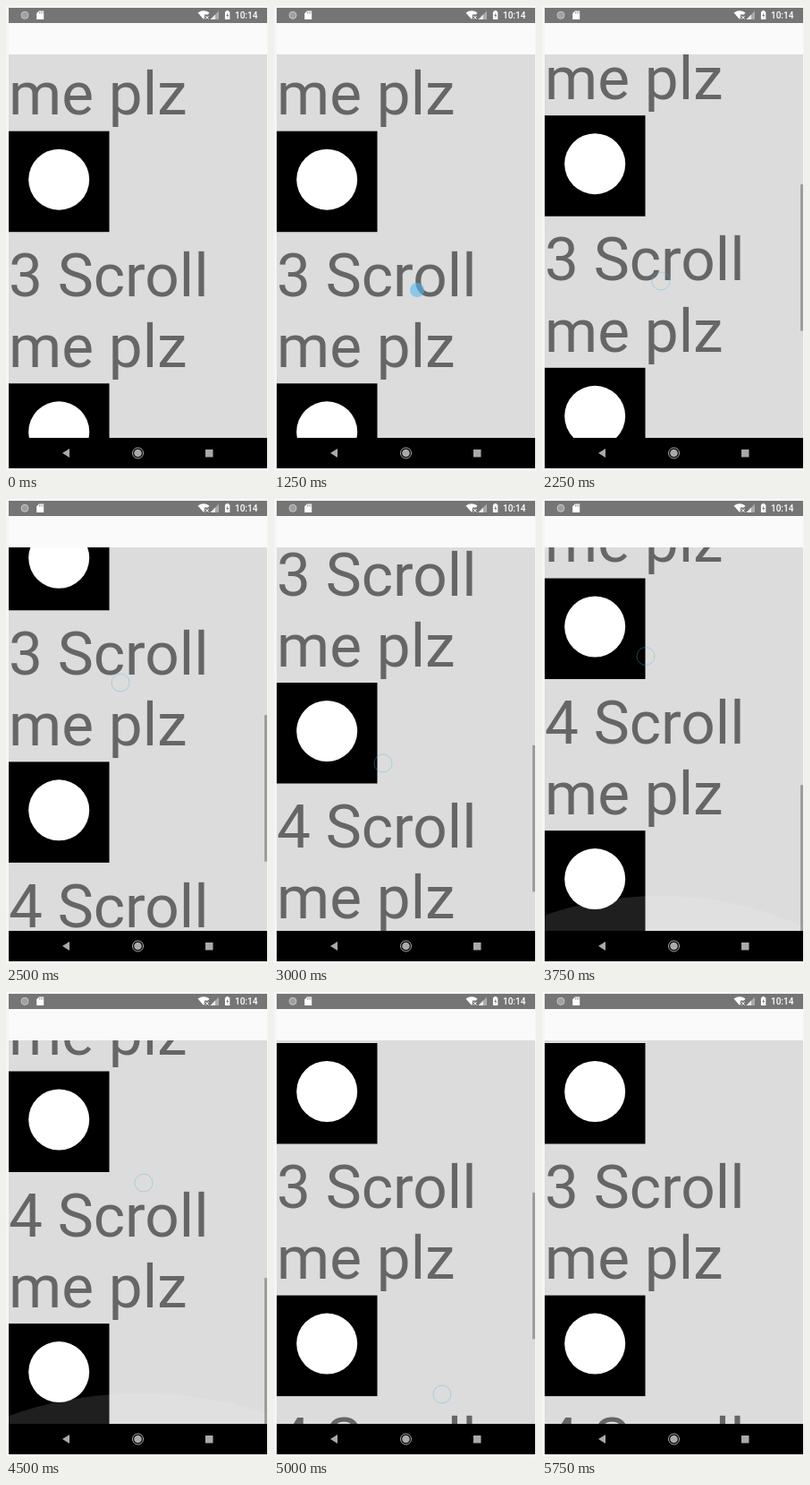
Recreate the animation shown at these times as an HTML page. Size 293x519 px, loop 6.25 s.

```html
<!DOCTYPE html>
<html lang="en">
<head>
<meta charset="utf-8">
<title>Scrolling list</title>
<style>
  html, body { margin: 0; width: 100%; height: 100%; overflow: hidden; background: #f5f5f5; }
  svg { display: block; width: 100vw; height: 100vh; }
  text { font-family: Roboto, sans-serif; }
  .big { font-size: 67.5px; fill: #666; }
  .clock { font-size: 10px; font-weight: 500; fill: #fff; }
</style>
</head>
<body>
<svg viewBox="0 0 293 519">
  <defs>
    <clipPath id="view"><rect x="3" y="54" width="289" height="429"/></clipPath>
  </defs>

  <rect x="3" y="54" width="289" height="429" fill="#dcdcdc"/>
  <g clip-path="url(#view)">
    <g id="list"></g>
    <ellipse id="glow" rx="347" fill="#fff" fill-opacity=".12"/>
    <rect id="bar" x="289" width="3" height="163.5" fill="#000" fill-opacity=".29"/>
  </g>

  <!-- status bar and header -->
  <rect x="3" y="2" width="289" height="17" fill="#757575"/>
  <rect x="3" y="19" width="289" height="35" fill="#fafafa"/>
  <circle cx="21" cy="10.3" r="4" fill="#a0a0a0" stroke="#c8c8c8"/>
  <path d="M37 5.5h5.2V15h-8V8.3z" fill="#fff"/>
  <path d="M37.5 6.5v2m1.7-2v2m1.7-2v2" stroke="#888" stroke-width=".8"/>
  <path d="M214.5 7.6q6.5-4.6 13 0l-1.6 2h-4v4l-1 1.2z" fill="#fff"/>
  <path d="M223 11l3.6 3.6m0-3.6L223 14.6" stroke="#fff"/>
  <path d="M238 5.5V15h-9.5z" fill="#aaa"/>
  <path d="M234 9.5V15h-5.5z" fill="#e8e8e8"/>
  <path d="M246.3 5h2.6v1.2h1.4V15h-5.4V6.2h1.4z" fill="#fff"/>
  <path d="M248 7.5L246.3 11h1.3v2.6l1.5-3.6h-1.3z" fill="#757575"/>
  <text class="clock" x="256" y="14">10:14</text>

  <!-- navigation bar -->
  <rect x="3" y="482" width="289" height="34" fill="#000"/>
  <path d="M71 494v10l-8-5z" fill="#aaa"/>
  <circle cx="147.5" cy="499" r="6" fill="none" stroke="#aaa"/>
  <circle cx="147.5" cy="499" r="4.3" fill="#aaa"/>
  <rect x="223" y="495" width="8.5" height="8.5" fill="#aaa"/>

  <circle id="pointer"/>
</svg>
<script>
  const STEP = 250, LOOP = 6250;
  const PITCH = 281.6, TILE = 112.5, FIRST_TILE = 139.7;
  const CENTER = 147.5, VIEW_BOTTOM = 483, GLOW_RADIUS = 347, GLOW_HEIGHT = 46;
  const [list, glow, bar, pointer] =
    ['list', 'glow', 'bar', 'pointer'].map(id => document.getElementById(id));

  const item = n => {
    const y = FIRST_TILE + (n - 2) * PITCH;
    return `<text class="big" x="3" y="${y - 97.4}">${n} Scroll</text>
      <text class="big" x="3" y="${y - 18.3}">me plz</text>
      <rect x="3" y="${y}" width="${TILE}" height="${TILE}" fill="#000"/>
      <circle cx="59.2" cy="${y + 54}" r="34" fill="#fff"/>`;
  };
  list.innerHTML = [2, 3, 4].map(item).join('');

  // Key points: step, then values
  const path = [[1, 185, 195], [5, 160, 317], [6, 154, 317], [7, 136, 217], [8, 140, 306],
    [9, 133, 307], [10, 128, 205], [12, 122, 295], [15, 116, 175.5],
    [17, 150, 227], [18, 154, 213], [20, 188, 449], [21, 174, 231]];
  const drags = [[6, 7], [9, 10], [12, 15], [18, 20]];
  const scroll = [[8, 0], [9, 17.5], [12, 216.3], [13, 332.8], [18, 332.8], [20, 82.7]];
  const pull = [[12, 0], [15, 40], [18, 35], [19, 0]];
  const barFade = [[8, 0], [9, 1], [21, 1], [23, 0]];

  // Interpolates between key points, easing out when power > 1
  function track(keys, step, power = 1) {
    const next = keys.findIndex(([at]) => at > step);
    if (next < 1) return keys.at(next).slice(1);
    const [t0, ...from] = keys[next - 1], [t1, ...to] = keys[next];
    const eased = 1 - (1 - (step - t0) / (t1 - t0)) ** power;
    return from.map((v, i) => v + (to[i] - v) * eased);
  }

  const set = (el, attrs) => {
    for (const name in attrs) el.setAttribute(name, attrs[name]);
  };

  function draw(step) {
    const [offset] = track(scroll, step, 2);
    set(list, { transform: `translate(0 ${-offset})` });
    set(bar, { y: 192.4 + offset * 0.381, opacity: track(barFade, step)[0] });

    const [cx, cy] = track(path, step, 3);
    const pressed = drags.some(([from, to]) => step >= from && step <= to);
    set(pointer, { cx, cy, opacity: step >= 1 && step <= 21 ? 1 : 0 });
    set(pointer, pressed
      ? { r: 10, fill: 'none', stroke: 'rgba(80,180,230,.38)' }
      : { r: 8, fill: 'rgba(80,185,245,.58)', stroke: 'none' });

    // The overscroll glow leans towards the finger
    const [height] = track(pull, step);
    const ry = GLOW_RADIUS * height / GLOW_HEIGHT;
    set(glow, {
      ry, cx: CENTER + (cx - CENTER) / 2,
      cy: VIEW_BOTTOM - height + ry, opacity: height ? 1 : 0
    });
  }

  const start = performance.now();
  function tick() {
    draw(Math.floor((performance.now() - start) % LOOP / STEP));
    requestAnimationFrame(tick);
  }
  // Before the first key, track() must yield its values rather than the last ones
  for (const keys of [path, scroll, pull, barFade]) keys.unshift([0, ...keys[0].slice(1)]);
  tick();
</script>
</body>
</html>
```
